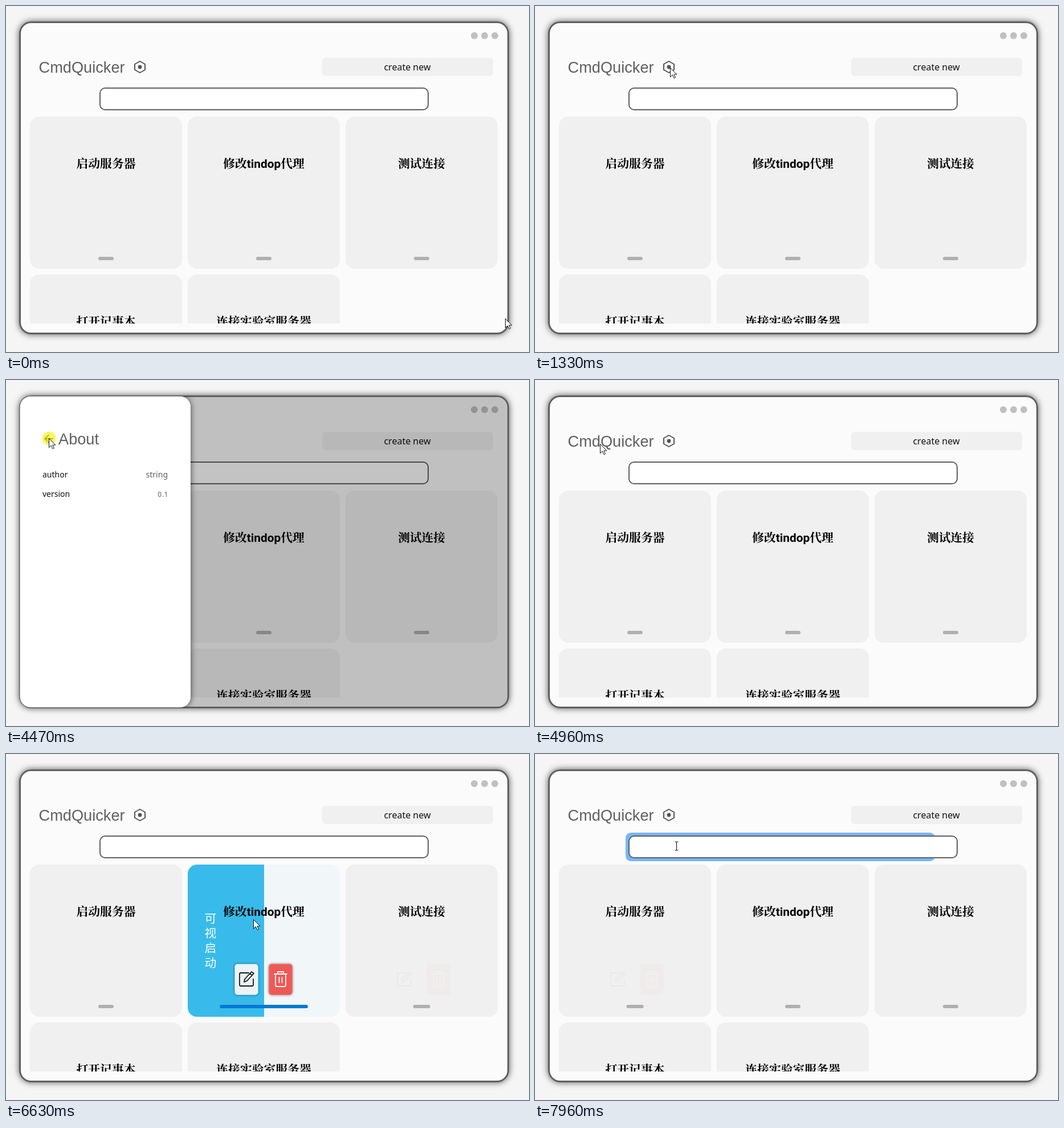
Recreate the animation shown at these times as an HTML page. Size 918 by 607 pixels, loop 8000 ms.

```html
<!DOCTYPE html>
<html lang="zh">
<head>
<meta charset="utf-8">
<title>CmdQuicker</title>
<style>
  html, body { margin: 0; width: 100%; height: 100%; overflow: hidden; background: #f5f5f5; }
  svg { display: block; width: 918px; height: 607px; }
  .head { font: 27.2px "Liberation Sans", Arial, sans-serif; fill: #606060; }
  .ui { font: 16px "Noto Sans", "Open Sans", sans-serif; fill: #111; }
  .small { font-size: 14px; }
  .soft { fill: #606060; }
  .title { font: 700 20.8px Roboto, "Noto Serif CJK SC", "Noto Sans CJK SC", "Noto Sans CJK", sans-serif; text-anchor: middle; }
  .side { font: 300 20.8px "Noto Sans CJK SC", "Noto Sans CJK", sans-serif; fill: #fff; text-anchor: middle; }
  .line { fill: none; stroke-width: 1.8; stroke-linecap: round; stroke-linejoin: round; }
</style>
</head>
<body>
<svg viewBox="0 0 918 607">
  <defs>
    <filter id="shadow" x="-20%" y="-20%" width="140%" height="140%">
      <feDropShadow dx="0" dy="0" stdDeviation="6" flood-color="#000" flood-opacity=".65"/>
    </filter>
    <filter id="lift" x="-40%" y="-40%" width="180%" height="180%">
      <feDropShadow dx="0" dy="0" stdDeviation="2.2" flood-color="#000" flood-opacity=".6"/>
    </filter>
    <clipPath id="inside"><rect x="24.5" y="28.5" width="857" height="546" rx="19"/></clipPath>
    <clipPath id="list"><rect x="30" y="190" width="845" height="367"/></clipPath>
    <clipPath id="round"><rect width="267" height="267" rx="16"/></clipPath>
  </defs>

  <rect x="23" y="27" width="860" height="549" rx="21" fill="#606060" filter="url(#shadow)"/>
  <rect x="26" y="30" width="854" height="543" rx="18" fill="#fbfbfb"/>
  <g fill="#c0c0c0">
    <circle cx="822" cy="52" r="6"/><circle cx="840" cy="52" r="6"/><circle cx="858" cy="52" r="6"/>
  </g>
  <text class="head" x="57.5" y="117">CmdQuicker</text>
  <g fill="none" stroke="#555" stroke-width="2" stroke-linejoin="round">
    <path d="M235 97l9 5v10l-9 5l-9-5v-10z"/>
    <circle cx="235" cy="107" r="3.4" fill="#555" stroke="none"/>
  </g>
  <rect x="555" y="91" width="300" height="32" rx="6" fill="#f0f0f0"/>
  <text class="ui" x="704.5" y="113" text-anchor="middle">create new</text>
  <rect id="glow" x="159" y="138" height="50" rx="9" fill="#75b6fa"/>
  <rect x="165" y="144" width="576" height="38" rx="9" fill="#fff" stroke="#606060" stroke-width="2"/>
  <g id="cards" clip-path="url(#list)"></g>

  <rect id="dim" x="26" y="30" width="854" height="543" rx="18"/>
  <g clip-path="url(#inside)">
    <g id="panel">
      <rect x="24" y="28.5" width="300" height="546" rx="19" fill="#fff" filter="url(#shadow)"/>
      <path class="line" d="M82 103H68M75 96.5L68 103L75 109.5" stroke="#555"/>
      <text class="head" x="92" y="113">About</text>
      <text class="ui small" x="64" y="171">author</text>
      <text class="ui small" x="64" y="205">version</text>
      <g text-anchor="end">
        <text class="ui small soft" x="284" y="171">string</text>
        <text class="ui soft" x="285" y="205" style="font-size:12px;letter-spacing:.6px">0.1</text>
      </g>
    </g>
  </g>

  <circle id="click" r="12" fill="#f6f000" opacity=".62"/>
  <path id="arrow" d="M0 0V16L3.8 12.4L6.6 18.2L9 17.1L6.3 11.5H11.4Z" fill="#fff" stroke="#111" stroke-linejoin="round"/>
  <path id="beam" d="M-3-7.5H-1L0-6.5L1-7.5H3M0-6.5V6.5M-3 7.5H-1L0 6.5L1 7.5H3" fill="none" stroke="#222" stroke-width="1.2"/>
</svg>

<script>
const LOOP = 8000, FADE = 400;
const OPEN_AT = 2860, CLOSE_AT = 4540;
const CLICKS = [2750, 4400], CLICK_LENGTH = 140;
const $ = id => document.getElementById(id);

// Pointer way points: time, x, y
const PATH = [
  [70, 876, 548], [280, 790, 440], [530, 600, 340], [840, 310, 235], [910, 285, 205],
  [980, 255, 168], [1050, 240, 125], [1190, 237, 108], [2550, 237, 108], [2560, 238, 107],
  [3450, 238, 107], [3900, 130, 104], [4260, 75, 102], [4820, 75, 102], [5160, 170, 125],
  [5300, 300, 150], [5440, 480, 175], [5580, 660, 225], [5790, 742, 258], [6070, 738, 261],
  [6300, 600, 280], [6600, 450, 290], [6840, 325, 290], [6900, 308, 289], [7050, 167, 278],
  [7400, 172, 282], [7600, 215, 215], [7640, 222, 193], [7700, 232, 182], [7820, 246, 164],
  [7960, 248, 161]
];

const TITLES = ["启动服务器", "修改tindop代理", "测试连接", "打开记事本", "连接实验室服务器"];

// CSS "ease": cubic-bezier(.25, .1, .25, 1)
function ease(x) {
  if (x <= 0) return 0;
  if (x >= 1) return 1;
  const curve = (a, b, u) => 3 * a * u * (1 - u) ** 2 + 3 * b * u * u * (1 - u) + u ** 3;
  let low = 0, high = 1;
  for (let i = 0; i < 18; i++) {
    const mid = (low + high) / 2;
    if (curve(.25, .25, mid) < x) low = mid; else high = mid;
  }
  return curve(.1, 1, low);
}

function pointer(t) {
  const next = PATH.findIndex(p => p[0] > t);
  if (next === 0) return { x: PATH[0][1], y: PATH[0][2] };
  if (next < 0) return { x: PATH.at(-1)[1], y: PATH.at(-1)[2] };
  const [t0, x0, y0] = PATH[next - 1], [t1, x1, y1] = PATH[next];
  const k = (t - t0) / (t1 - t0);
  return { x: x0 + (x1 - x0) * k, y: y0 + (y1 - y0) * k };
}

// A transition that follows an on/off test of time, reversing from where it stands
function transition(isOn) {
  const runs = [{ start: -FADE, from: 0, to: 0 }];
  const value = (run, t) => {
    const span = FADE * Math.abs(run.to - run.from);
    return span ? run.from + (run.to - run.from) * ease((t - run.start) / span) : run.to;
  };
  for (let t = 0; t < LOOP; t += 5) {
    const last = runs.at(-1), to = +isOn(t);
    if (to !== last.to) runs.push({ start: t, from: value(last, t), to });
  }
  return t => value(runs.findLast(run => run.start <= t), t);
}

const within = (p, x, y, w, h) => p.x >= x && p.x < x + w && p.y >= y && p.y < y + h;
const overSearch = t => within(pointer(t), 164, 143, 578, 40);
const sideText = (text, x) => [...text].map((c, i) =>
  `<text class="side" x="${x}" y="${141 + 26 * (i - (text.length - 1) / 2)}">${c}</text>`).join("");

const cards = TITLES.map((title, i) => {
  const x = 42 + i % 3 * 277, y = 194 + Math.floor(i / 3) * 277;
  const group = document.createElementNS("http://www.w3.org/2000/svg", "g");
  group.setAttribute("transform", `translate(${x} ${y})`);
  group.innerHTML = `
    <g clip-path="url(#round)">
      <rect class="base" width="267" height="267"/>
      <g class="left"><rect width="134" height="267" fill="#38bbea"/>${sideText("可视启动", 40)}</g>
      <g class="right"><rect x="134" width="133" height="267" fill="#b9eef9"/>${sideText("不可视启动", 227)}</g>
    </g>
    <text class="title" x="133.5" y="90">${title}</text>
    <g class="tools">
      <rect x="82.5" y="174.5" width="41" height="54" rx="5" fill="#f5f5f5" filter="url(#lift)"/>
      <path class="line" stroke="#111" d="M107 190H93Q91 190 91 192V211Q91 213 93 213H113Q115 213 115 211V201M99 206L100 201L112 188L116 191L104 204ZM109 191L113 194"/>
      <rect x="142.5" y="174.5" width="41" height="54" rx="5" fill="#ef5350" filter="url(#lift)"/>
      <path class="line" stroke="#fff" d="M152 192H174M158 192V188H168V192M154 192V211Q154 214 157 214H169Q172 214 172 211V192M160.5 198V207M165.5 198V207"/>
    </g>
    <rect class="bar" y="246" height="6" rx="3"/>`;
  $("cards").append(group);
  const part = name => group.querySelector("." + name);
  const isOver = t => { const p = pointer(t); return p.y < 557 && within(p, x, y, 267, 267); };
  return {
    x, isOver, grow: transition(isOver),
    base: part("base"), left: part("left"), right: part("right"), tools: part("tools"), bar: part("bar")
  };
});

const glowAt = transition(overSearch);
const panelAt = transition(t => t >= OPEN_AT && t < CLOSE_AT);
const show = (node, visible) => node.setAttribute("display", visible ? "inline" : "none");

function draw(t) {
  const p = pointer(t);
  for (const card of cards) {
    const over = card.isOver(t), k = card.grow(t), onLeft = p.x < card.x + 133.5;
    card.base.setAttribute("fill", over ? "#f1f6f9" : "#f0f0f0");
    show(card.left, over && onLeft);
    show(card.right, over && !onLeft);
    show(card.tools, k > 0);
    card.tools.setAttribute("opacity", k);
    const width = 27 + 133 * k;
    card.bar.setAttribute("x", 133.5 - width / 2);
    card.bar.setAttribute("width", width);
    card.bar.setAttribute("fill", over ? "#0078d7" : "#b0b0b0");
  }

  const glow = glowAt(t);
  show($("glow"), glow > 0);
  $("glow").setAttribute("width", 588 * glow);

  const open = panelAt(t);
  show($("panel"), open > 0);
  $("panel").setAttribute("transform", `translate(${-300 * (1 - open)} 0)`);
  $("dim").setAttribute("opacity", .235 * open);

  const place = `translate(${Math.round(p.x) + .5} ${Math.round(p.y) + .5})`;
  const typing = overSearch(t);
  for (const id of ["click", "arrow", "beam"]) $(id).setAttribute("transform", place);
  show($("click"), CLICKS.some(c => t >= c && t < c + CLICK_LENGTH));
  show($("arrow"), !typing);
  show($("beam"), typing);
}

function tick() {
  draw(performance.now() % LOOP);
  requestAnimationFrame(tick);
}
tick();
</script>
</body>
</html>
```
